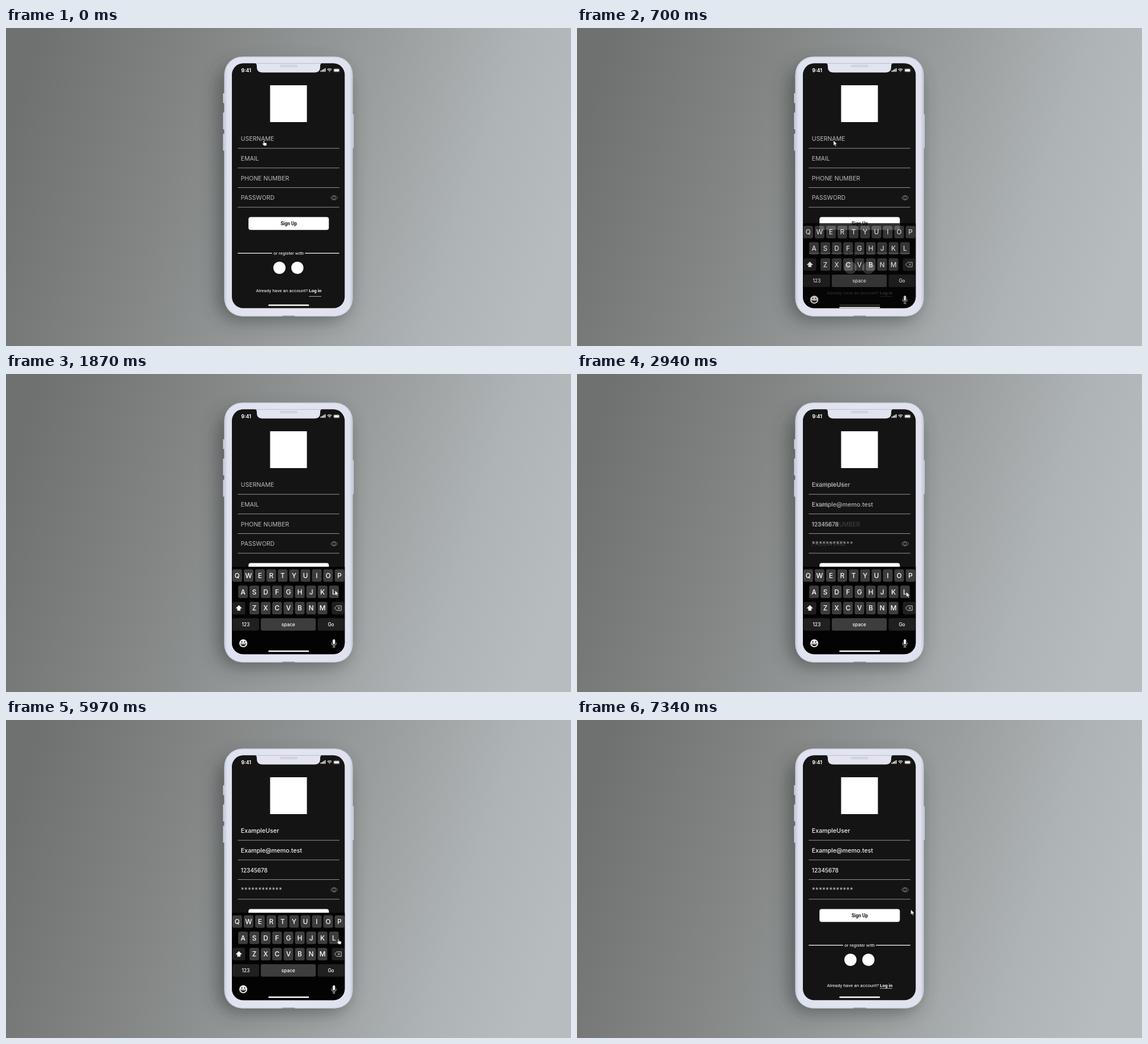
Write an HTML page that moves like this. It is 998 px wide and 561 px high and loops after 8000 ms.

```html
<!DOCTYPE html>
<html lang="en">
<head>
<meta charset="utf-8">
<title>Sign up form</title>
<style>
  html, body { margin: 0; width: 100%; height: 100%; overflow: hidden; background: #8b8e8e; }
  svg { display: block; width: 100%; height: 100%; }
  text { white-space: pre; }
  .ui { font-family: Inter, sans-serif; }
  .label { font: 400 10.5px Inter, sans-serif; letter-spacing: .03px; fill: #bebebe; }
  .value { font: 500 10.7px Inter, sans-serif; fill: #f2f2f2; }
  .value.num { font-size: 10px; }
  .value.stars { font: 400 10.1px "DejaVu Sans Mono", monospace; }
  .small { font: 400 8.1px Roboto, sans-serif; fill: #fff; }
  .bold { font-weight: 700; }
  .key { font: 500 11.8px Inter, sans-serif; fill: #fff; text-anchor: middle; }
  .key.word { font-size: 8.3px; }
</style>
</head>
<body>
<svg viewBox="0 0 998 561" preserveAspectRatio="none">
  <defs>
    <linearGradient id="wall" gradientUnits="userSpaceOnUse" x1="20" y1="130" x2="960" y2="430">
      <stop offset="0" stop-color="#6f7170"/>
      <stop offset=".3" stop-color="#838685"/>
      <stop offset=".6" stop-color="#9a9e9f"/>
      <stop offset=".82" stop-color="#aeb3b5"/>
      <stop offset="1" stop-color="#b7bcbe"/>
    </linearGradient>
    <linearGradient id="body" x1="0" x2="1" y1="0" y2="0">
      <stop offset="0" stop-color="#c6c9d8"/>
      <stop offset=".025" stop-color="#dfe2ef"/>
      <stop offset=".5" stop-color="#e3e6f1"/>
      <stop offset=".975" stop-color="#dfe2ee"/>
      <stop offset="1" stop-color="#c3c6d4"/>
    </linearGradient>
    <filter id="blur" x="-50%" y="-50%" width="200%" height="200%"><feGaussianBlur stdDeviation="16"/></filter>
    <clipPath id="screen"><rect x="399" y="62.3" width="199.3" height="432" rx="20"/></clipPath>
  </defs>

  <rect width="998" height="561" fill="url(#wall)"/>
  <rect x="374" y="66" width="232" height="450" rx="36" fill="#2c2e2e" opacity=".5" filter="url(#blur)"/>

  <g fill="#cfd2df">
    <rect x="383.4" y="115" width="4" height="17.5" rx="1"/>
    <rect x="383.4" y="149" width="4" height="30" rx="1"/>
    <rect x="383.4" y="186.5" width="4" height="30" rx="1"/>
    <rect x="611" y="152" width="3.2" height="60" rx="1"/>
  </g>
  <rect x="385.4" y="50.4" width="227.2" height="458.4" rx="32" fill="url(#body)"/>
  <rect x="386.2" y="51.2" width="225.6" height="456.8" rx="31" fill="none" stroke="#c8cbd9"/>
  <rect x="488" y="507.4" width="22.5" height="1.6" rx=".8" fill="#8e919c"/>

  <g clip-path="url(#screen)">
    <rect x="399" y="62" width="200" height="433" fill="#141414"/>

    <rect x="466.5" y="101" width="65" height="65" fill="#fff"/>

    <g id="fields"></g>
    <g fill="none" stroke="#8d8d8d" stroke-width=".9">
      <path d="M573.2 299.5q6.3-8 12.6 0q-6.3 8-12.6 0z"/>
      <circle cx="579.5" cy="299.5" r="2.7"/>
    </g>

    <rect x="428.3" y="333.4" width="142" height="22.8" rx="4" fill="#fff"/>
    <text class="small bold" x="499.5" y="347.9" text-anchor="middle" style="font-size:8.4px;fill:#141414">Sign Up</text>

    <path d="M409.3 397.4H470M528 397.4H588.8" stroke="#fff" stroke-width="1.2"/>
    <text class="small" x="499.1" y="399.7" text-anchor="middle">or register with</text>
    <circle cx="483" cy="423" r="10.8" fill="#fff"/>
    <circle cx="514.7" cy="423" r="10.8" fill="#fff"/>

    <g id="login">
      <text class="small" x="441.4" y="465.8">Already have an account?</text>
      <text class="small bold" x="535" y="465.8">Log in</text>
    </g>
    <path d="M535 473.5H557" stroke="#bbb" stroke-width=".9"/>
    <rect x="463.3" y="487.7" width="72" height="2.5" rx="1.2" fill="#fff"/>

    <g id="board" opacity="0">
      <rect x="399" y="340" width="200" height="190" fill="#030303"/>
      <g id="keys"></g>
      <path d="M411.3 407.8l5.7 5.8h-2.9v3.8h-5.6v-3.8h-2.9z" fill="#fff"/>
      <g fill="none" stroke="#ddd" stroke-width=".9" stroke-linejoin="round">
        <path d="M580.4 413l3.8-4.1h8v8.2h-8zM585.9 410.9l4 4.2M589.9 410.9l-4 4.2"/>
      </g>
      <circle cx="419.1" cy="475" r="7.1" fill="#eee"/>
      <g fill="#111">
        <ellipse cx="416.6" cy="472.6" rx=".9" ry="1.3"/>
        <ellipse cx="421.6" cy="472.6" rx=".9" ry="1.3"/>
        <path d="M414.2 475.6h9.8q-.7 4.4-4.9 4.4t-4.9-4.4z"/>
      </g>
      <path d="M415.4 476.6h7.4" stroke="#eee" stroke-width="1"/>
      <rect x="577" y="468" width="4.4" height="9" rx="2.2" fill="#eee"/>
      <path d="M575.2 474v1.3q0 3.6 4 3.6t4-3.6V474M579.2 479v2.6M576.8 481.7h4.8" fill="none" stroke="#eee" stroke-width=".9"/>
      <rect x="463.3" y="487.7" width="72" height="2.5" rx="1.2" fill="#fff"/>
    </g>

    <path d="M439 61.5q4 1 4 5v2.6q0 9.3 9.3 9.3h93.4q9.3 0 9.3-9.3v-2.6q0-4 4-5z" fill="#e2e5f0"/>
    <rect x="484.3" y="65.6" width="30" height="3" rx="1.5" fill="#d6d9e3" stroke="#bfc2cd" stroke-width=".7"/>

    <text class="ui" x="415.4" y="77.6" font-size="8.5" font-weight="700" fill="#fff">9:41</text>
    <g fill="#fff">
      <path d="M555.6 75h1.6v2.3h-1.6zM558 73.8h1.6v3.5H558zM560.4 72.4h1.6v4.9h-1.6zM562.8 71h1.6v6.3h-1.6z"/>
      <rect x="579.4" y="72.6" width="8.9" height="4.2" rx="1"/>
    </g>
    <g fill="none" stroke="#fff">
      <path d="M567.4 73.4q4-3.4 8 0M569 75.1q2.4-2 4.8 0" stroke-width="1.1"/>
      <circle cx="571.4" cy="76.8" r=".4"/>
      <rect x="578.5" y="71.7" width="10.7" height="6" rx="1.7" stroke-width=".5" opacity=".6"/>
    </g>
  </g>

  <g id="cursor" fill="#fff" stroke="#222" stroke-width=".5" stroke-linejoin="round">
    <path id="arrow" d="M0 0v8.8l2.1-1.9 1.4 3.2 1.4-.6-1.4-3.1h2.8z"/>
    <path id="hand" d="M2.2 1.2q.8-1.2 1.6 0v3l3.3.7q1.2.3 1 1.4l-.8 3.5H3.3L.5 6.6q-.5-1 .6-1.1l1.1.7z"/>
  </g>
</svg>

<script>
const LOOP = 8000;
const $ = id => document.getElementById(id);

function add(parent, tag, attrs, text) {
  const el = document.createElementNS('http://www.w3.org/2000/svg', tag);
  for (const k in attrs) el.setAttribute(k, attrs[k]);
  if (text) el.textContent = text;
  parent.appendChild(el);
  return el;
}

// Form rows: label, typed value, extra class
const labels = add($('fields'), 'g', {});
const values = add($('fields'), 'g', {});
[
  ['USERNAME', 'ExampleUser', ''],
  ['EMAIL', 'Example@memo.test', ''],
  ['PHONE NUMBER', '12345678', 'num'],
  ['PASSWORD', '*'.repeat(12), 'stars']
].forEach(([label, value, kind], i) => {
  const y = 199.4 + i * 34.65;
  add(labels, 'text', { class: 'label', x: 414.8, y }, label);
  add(values, 'text', { class: 'value ' + kind, x: 414.8, y }, value);
  add($('fields'), 'path', { d: `M409.3 ${y + 12.8}H588.8`, stroke: '#949494' });
});

// Keyboard
function key(x, y, w, text, fill, word) {
  add($('keys'), 'rect', { x: x - w / 2, y, width: w, height: 22, rx: 3, fill });
  if (text) add($('keys'), 'text', { class: word ? 'key word' : 'key', x, y: y + (word ? 13.8 : 15.3) }, text);
}
const LIGHT = '#3d3d3d', DARK = '#202020';
[['QWERTYUIOP', 408.4, 344.6], ['ASDFGHJKL', 418.6, 373.3], ['ZXCVBNM', 438.6, 402]].forEach(([row, x, y]) =>
  [...row].forEach((c, i) => key(x + i * 20.08, y, 17, c, LIGHT)));
key(411.3, 402, 22.4, '', DARK);
key(586.6, 402, 22, '', DARK);
key(423.5, 430.7, 47, '123', DARK, true);
key(498.6, 430.7, 97, 'space', LIGHT, true);
key(574, 430.7, 47, 'Go', DARK, true);

// Ease-out, cubic-bezier(0, 0, .58, 1)
function easeOut(x) {
  if (x <= 0) return 0;
  if (x >= 1) return 1;
  let lo = 0, hi = 1;
  for (let i = 0; i < 20; i++) {
    const s = (lo + hi) / 2;
    if (1.74 * (1 - s) * s * s + s ** 3 < x) lo = s; else hi = s;
  }
  return 3 * (1 - lo) * lo * lo + lo ** 3;
}
const ramp = (t, start, length) => easeOut((t - start) / length);

// Cursor stops: time, x, y
const path = [
  [0, 452.5, 198], [500, 452.5, 198], [600, 450.5, 198], [700, 453, 198.5],
  [940, 479, 206], [1120, 513, 247], [1300, 552, 308],
  [1480, 571, 345], [1700, 580, 375], [1940, 581.7, 384.5],
  [3770, 581.7, 384.5], [4000, 590, 396.7], [4240, 590, 396.7], [4370, 589, 400],
  [4570, 589, 400], [4850, 588, 394], [5200, 584, 388.3],
  [5960, 584, 388.3], [6200, 592, 331.5], [6410, 592, 331.5],
  [6520, 592.7, 332.5], [6670, 589.7, 334.5], [LOOP, 589.7, 334.5]
];
const handTimes = [[0, 500], [2200, 2770], [5470, 6000]];

function cursorAt(t) {
  const i = path.findIndex(p => p[0] > t);
  const [t0, x0, y0] = path[i - 1], [t1, x1, y1] = path[i];
  const k = (t - t0) / (t1 - t0);
  return [x0 + (x1 - x0) * k, y0 + (y1 - y0) * k];
}

function draw(t) {
  const opened = ramp(t, 484, 340);
  const shown = opened - ramp(t, 6985, 340);
  $('board').setAttribute('opacity', shown);
  $('board').setAttribute('transform', `translate(0 ${24 * (1 - shown)})`);
  $('login').setAttribute('transform', `translate(0 ${5 * opened})`);

  const filled = ramp(t, 2755, 350);
  labels.setAttribute('opacity', 1 - filled);
  values.setAttribute('opacity', filled);

  const [x, y] = cursorAt(t);
  $('cursor').setAttribute('transform', `translate(${x} ${y})`);
  const hand = handTimes.some(([a, b]) => t >= a && t < b);
  $('hand').setAttribute('visibility', hand ? 'visible' : 'hidden');
  $('arrow').setAttribute('visibility', hand ? 'hidden' : 'visible');
}

const start = performance.now();
function tick() {
  draw((performance.now() - start) % LOOP);
  requestAnimationFrame(tick);
}
tick();
</script>
</body>
</html>
```
